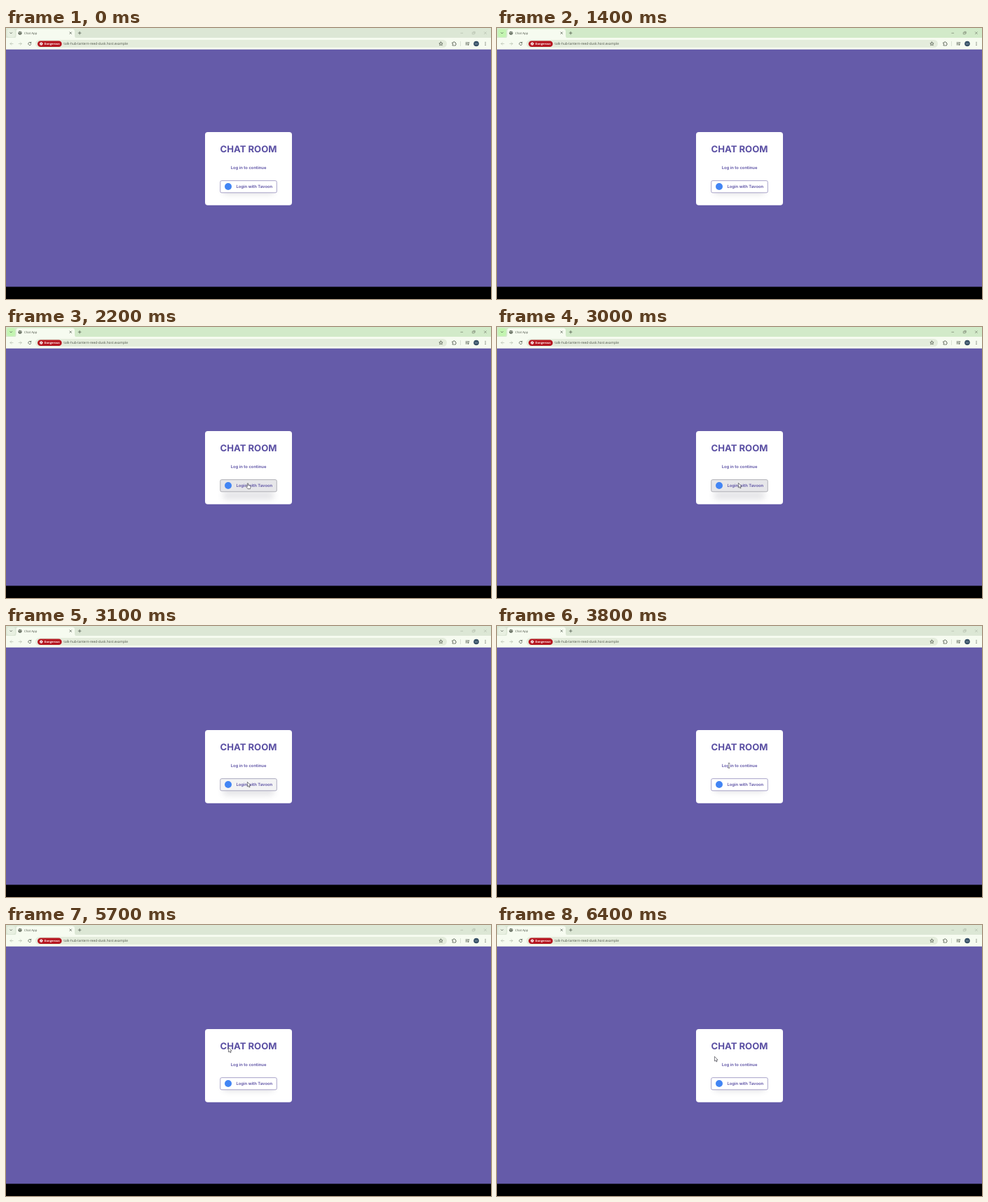
An HTML page for the animation above (8 s loop, 692x388 px).

```html
<!DOCTYPE html>
<html lang="en">
<head>
<meta charset="utf-8">
<title>Chat App</title>
<style>
  html, body { margin: 0; width: 100%; height: 100%; overflow: hidden; background: #000; }
  svg { display: block; width: 100%; height: 100%; }
  text { text-rendering: geometricPrecision; }
  .ui { font-family: "Open Sans", "Noto Sans", sans-serif; fill: #4a5246; }
  .card { font-family: Inter, "Open Sans", sans-serif; fill: #5a4fa3; text-anchor: middle; }
  .line { fill: none; stroke: #465042; stroke-width: .7; stroke-linecap: round; stroke-linejoin: round; }
  .soft { stroke: #77826f; }
  .dim { stroke: #b3bdad; }
</style>
</head>
<body>
<svg viewBox="0 0 692 388">
  <defs>
    <filter id="blur" x="-30%" y="-150%" width="160%" height="400%">
      <feGaussianBlur stdDeviation="4"/>
    </filter>
  </defs>

  <!-- tab strip -->
  <rect id="strip" width="692" height="15"/>
  <rect id="drop" x="1.5" y="1.500" width="11.500" height="11.500" rx="3.500"/>
  <path class="line" d="M5.800 6.600l1.400 1.400 1.400-1.400"/>
  <path d="M11 14.500q3.500 0 3.500-3.500V5q0-3.500 3.500-3.500H94.500q3.500 0 3.500 3.500v6q0 3.500 3.500 3.500z" fill="#f6fbf0"/>
  <circle cx="20" cy="7.200" r="2.500" fill="#465042"/>
  <path d="M18.200 6.300l1.700.5-.3 1.600M20.200 5.200l.4 1.100 1.200.3M20.600 8.800l1-1" fill="none" stroke="#f6fbf0" stroke-width=".7"/>
  <text class="ui" x="26" y="8.800" font-size="4.300">Chat App</text>
  <path class="line" d="M90.900 5.900l2.600 2.600m0-2.600l-2.600 2.600M103.200 7.200h3.800M105.100 5.300v3.800"/>
  <g id="controls">
    <path d="M648.800 7.300h2.900"/>
    <path d="M665.700 6.300h2.500v2.500h-2.500zM666.800 5.300h2.400v2.400"/>
    <path d="M682.400 5.700l2.900 2.900m0-2.900l-2.900 2.900"/>
  </g>

  <!-- toolbar -->
  <rect y="14" width="692" height="17" fill="#f6fbf0"/>
  <path class="line dim" d="M10 22.500H6m1.800-1.800l-1.800 1.800 1.800 1.800M18.200 22.500h4m-1.800-1.800l1.800 1.800-1.800 1.800"/>
  <path class="line" d="M35.500 21.200a2.100 2.100 0 1 0 .4 1.900M35.800 20.100v1.400h-1.400"/>
  <rect x="42" y="17" width="587" height="11" rx="5.500" fill="#e4ecdc"/>
  <rect x="45" y="18.400" width="34.600" height="8.500" rx="4.250" fill="#b5151f"/>
  <circle cx="50.300" cy="22.600" r="2.200" fill="#fff"/>
  <path d="M49.500 21.800l1.600 1.600m0-1.600l-1.600 1.600" stroke="#b5151f" stroke-width=".7"/>
  <text class="ui" x="54.500" y="24.200" font-size="4.100" font-weight="700" style="fill:#fbe9e9">Dangerous</text>
  <text class="ui" x="82.300" y="24.400" font-size="4.800">talk-hub-lantern-reed-dusk.host.example</text>
  <path class="line" d="M620.500 20l.8 1.700 1.800.2-1.300 1.200.4 1.800-1.700-.9-1.700.9.4-1.800-1.300-1.200 1.800-.2z"/>
  <path class="line" d="M637 20.900h1.300q0-1.300 1-1.300t1 1.300h1.200v1.300q1 0 1 .8t-1 .8v1.300H637v-1.300q1-.1 1-.8t-1-.8z"/>
  <path d="M648.500 19v7" stroke="#d3dccd" stroke-width=".8"/>
  <path class="line" d="M656 20.800h3.400M656 22.400h2.300M656 24h1.500M660 24v-3.200h.9"/>
  <circle cx="659.300" cy="24.100" r=".8" fill="#465042"/>
  <circle cx="671" cy="22.500" r="3.800" fill="#344e63"/>
  <text class="ui" x="671" y="23.900" font-size="3.800" text-anchor="middle" style="fill:#c4d2dc">M</text>
  <g fill="#465042">
    <circle cx="684" cy="20.600" r=".6"/><circle cx="684" cy="22.500" r=".6"/><circle cx="684" cy="24.400" r=".6"/>
  </g>

  <!-- page -->
  <rect y="30.700" width="692" height="341" fill="#655ba9"/>
  <rect y="370.500" width="692" height="17.500"/>
  <rect x="284" y="149" width="124" height="104.700" rx="4" fill="#fff"/>
  <text class="card" x="346" y="178.400" font-size="13.100" font-weight="700">CHAT ROOM</text>
  <text class="card" x="346" y="201.600" font-size="5.900" font-weight="600">Log in to continue</text>
  <rect id="shadow" x="309" width="74" height="12" rx="6" fill="#45455a" filter="url(#blur)"/>
  <rect id="button" x="305.700" y="218.600" width="80.600" height="17.200" rx="2" stroke-width=".7"/>
  <circle cx="317" cy="227" r="5" fill="#4285f4"/>
  <text class="card" x="354.300" y="229" font-size="5.900" font-weight="600">Login with Tavoon</text>

  <!-- pointers, each drawn from its hot spot -->
  <g fill="#fff" stroke="#4a4a52" stroke-width=".7" stroke-linejoin="round">
    <path id="arrow" d="M0 0v6.800l1.500-1.400 1 2.300 1.200-.5-1-2.200h2z"/>
    <path id="hand" d="M0 .7q.7-1 1.400 0v2.600l2.600.6q.9.300.8 1.300l-.6 3.200H.7L-1.500 5.400q-.2-1 .7-.8l.8.800z"/>
    <g id="beam" fill="none">
      <path d="M-1.300 0h2.600M0 0v7M-1.300 7h2.600" stroke="#fff" stroke-width="1.700"/>
      <path d="M-1.300 0h2.600M0 0v7M-1.300 7h2.600"/>
    </g>
  </g>
</svg>
<script>
const LOOP = 8000;
const $ = id => document.getElementById(id);

// time, pointer shape, x, y
const pointerSteps = [
  [0],
  [1700, "arrow", 347.5, 244.5], [1800],
  [2000, "hand", 344.3, 223.3],
  [2900, "arrow", 344.4, 223.3],
  [3700, "arrow", 339, 213],
  [3800, "beam", 331, 196.3],
  [3900, "arrow", 329, 187],
  [4000, "arrow", 327.5, 178],
  [4100, "arrow", 326.3, 170],
  [4200, "arrow", 325.6, 165.6], [4300],
  [5700, "arrow", 317.4, 175.2],
  [5800, "arrow", 315, 180],
  [5900, "arrow", 312.5, 185], [6000],
  [6400, "arrow", 310.4, 188.2]
];
const hoverSteps = [[0, 0], [2000, .35], [2100, .7], [2200, 1], [3100, .5], [3200, 0]];
const activeSteps = [[0, false], [1400, true], [3100, false]];

const stepAt = (steps, t) => steps.findLast(s => s[0] <= t);
const mix = (a, b, k) => `rgb(${a.map((v, i) => Math.round(v + (b[i] - v) * k))})`;

function set(id, attrs) {
  for (const name in attrs) $(id).setAttribute(name, attrs[name]);
}

function draw(t) {
  const [, shape, x, y] = stepAt(pointerSteps, t);
  const hover = stepAt(hoverSteps, t)[1];
  const active = stepAt(activeSteps, t)[1];

  for (const id of ["arrow", "hand", "beam"]) {
    const on = id === shape;
    $(id).style.display = on ? "" : "none";
    if (on) set(id, { transform: `translate(${x} ${y})` });
  }
  set("strip", { fill: active ? "#d2eac9" : "#dce7d5" });
  set("drop", { fill: active ? "#c3f5b1" : "#e8f0e1" });
  set("controls", { class: active ? "line soft" : "line dim" });
  set("button", {
    fill: mix([255, 255, 255], [230, 230, 233], hover),
    stroke: mix([134, 127, 180], [148, 148, 157], hover)
  });
  set("shadow", { y: 226 + hover * 9, opacity: .14 });
}

function tick(now) {
  draw(now % LOOP);
  requestAnimationFrame(tick);
}
draw(0);
requestAnimationFrame(tick);
</script>
</body>
</html>
```
